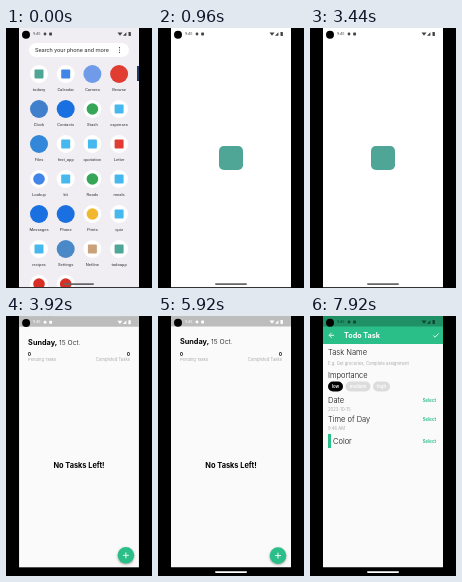
An HTML page with a canvas for the animation above (8 s loop, 146x260 px).

```html
<!DOCTYPE html>
<html lang="en">
<head>
<meta charset="utf-8">
<title>Todo app launch</title>
<style>
html, body { margin: 0; width: 100%; height: 100%; overflow: hidden; background: #000; }
canvas { display: block; width: 100vw; height: 100vh; }
</style>
</head>
<body>
<canvas></canvas>
<script>
const W = 146, H = 260, LOOP = 8000;
const PAGE_HEIGHT = 251.5, ROUTE_TIME = 320;
const GREEN = '#2abf88', BLUE = '#1a70e0', SKY = '#46b8ee', TEAL = '#4fa596', RED = '#e03c31';
const UI = 'Inter, "Open Sans", sans-serif', SYSTEM = 'Roboto, "Noto Sans", sans-serif';
const canvas = document.querySelector('canvas');
const ctx = canvas.getContext('2d');

const clamp = v => Math.max(0, Math.min(1, v));
const span = (t, start, length) => clamp((t - start) / length);
const lerp = (a, b, p) => a + (b - a) * p;
const easeOut = (p, power = 3) => 1 - (1 - p) ** power;

function box(x, y, w, h, color, radius = 0) {
  ctx.fillStyle = color;
  ctx.beginPath();
  ctx.roundRect(x, y, w, h, radius);
  ctx.fill();
}

function disc(x, y, r, color) {
  ctx.fillStyle = color;
  ctx.beginPath();
  ctx.arc(x, y, r, 0, 2 * Math.PI);
  ctx.fill();
}

function line(color, width, ...points) {
  ctx.strokeStyle = color;
  ctx.lineWidth = width;
  ctx.beginPath();
  points.forEach(([x, y]) => ctx.lineTo(x, y));
  ctx.stroke();
}

function text(str, x, y, size, color, { weight = 400, align = 'left', family = UI } = {}) {
  ctx.font = `${weight} ${size}px ${family}`;
  ctx.textAlign = align;
  ctx.textBaseline = 'middle';
  ctx.fillStyle = color;
  ctx.fillText(str, x, y);
}

function clipTo(x, y, w, h, draw) {
  ctx.save();
  ctx.beginPath();
  ctx.rect(x, y, w, h);
  ctx.clip();
  draw();
  ctx.restore();
}

// Launcher entries: label, color, shape (full disc, or square / dot on a white plate)
const flutterApp = label => [label, SKY, 'square'];
const apps = [
  ['todoey', TEAL, 'square'], ['Calendar', '#4285e8', 'square'], ['Camera', '#6f9be8', 'full'], ['Browse', RED, 'full'],
  ['Clock', '#3f7fcb', 'full'], ['Contacts', BLUE, 'full'], ['Stash', '#35a556', 'dot'], flutterApp('expenses'),
  ['Files', '#3287d8', 'full'], flutterApp('first_app'), flutterApp('quotation'), ['Letter', RED, 'square'],
  ['Lookup', '#4285e8', 'dot'], flutterApp('kit'), ['Roads', '#35a556', 'dot'], flutterApp('meals'),
  ['Messages', BLUE, 'full'], ['Phone', BLUE, 'full'], ['Prints', '#f0b72f', 'dot'], flutterApp('quiz'),
  flutterApp('recipes'), ['Settings', '#4a88c8', 'full'], ['Netline', '#c9a27c', 'square'], ['todoapp', TEAL, 'square'],
  ['', '#d93025', 'dot'], ['', '#d93025', 'dot']
];

function appIcon(x, y, color, shape) {
  disc(x, y, 9, shape === 'full' ? color : '#fff');
  if (shape === 'square') box(x - 4.5, y - 4.5, 9, 9, color, 1);
  if (shape === 'dot') disc(x, y, 5.8, color);
}

function screenEdge() {
  box(13, 259, 120, 1, '#333');
}

function launcher() {
  box(13, 0, 120, 260, '#f0eef2');
  box(23, 15, 100, 14, '#fff', 7);
  text('Search your phone and more', 29, 22.3, 5.8, '#333', { family: SYSTEM });
  [19.7, 22, 24.3].forEach(y => disc(113.5, y, 0.6, '#333'));
  apps.forEach(([label, color, shape], i) => {
    const x = 33 + (i % 4) * 26.7, y = 46 + Math.floor(i / 4) * 35;
    appIcon(x, y, color, shape);
    text(label, x, y + 15.5, 4.2, '#333', { align: 'center', family: SYSTEM });
  });
  box(131, 38, 2, 15, '#203a66');
  box(58, 255.3, 30, 1.6, '#666', 0.8);
  screenEdge();
  statusBar('#444');
}

function statusBar(color) {
  disc(20, 6.7, 4, '#000');
  text('9:45', 27, 6.1, 3.8, color, { family: SYSTEM });
  disc(39, 6, 1.4, color);
  box(43.2, 4.6, 2.8, 2.8, color, 0.6);
  ctx.fillStyle = color;
  ctx.beginPath();
  ctx.moveTo(111.5, 4.5); ctx.lineTo(116.5, 4.5); ctx.lineTo(114, 7.8);
  ctx.moveTo(117, 7.8); ctx.lineTo(120.4, 7.8); ctx.lineTo(120.4, 4.2);
  ctx.fill();
  box(122.5, 4, 2.4, 3.9, color, 0.4);
}

// The window grows out of the tapped icon until it fills the screen
function splash(t) {
  const p = easeOut(span(t, 80, 360)), wide = easeOut(span(t, 80, 360), 4);
  const x = lerp(104, 13, wide), y = lerp(213, 0, p);
  const w = lerp(18, 120, wide), h = lerp(231, 260, p) - y;
  box(x, y, w, h, '#fff', 9 * (1 - p));
  const size = lerp(9, 24, p);
  box(lerp(113, 73, p) - size / 2, lerp(222, 130, p) - size / 2, size, size, TEAL, size * 0.2);
  ctx.save();
  ctx.globalAlpha *= span(t, 400, 400);
  box(57, 255.2, 32, 1.7, '#666', 0.8);
  ctx.restore();
  screenEdge();
  statusBar('#444');
}

function addButton(t) {
  const press = span(t, 6640, 240), release = span(t, 6880, 240);
  ctx.save();
  ctx.shadowColor = 'rgba(0,0,0,.35)';
  ctx.shadowBlur = 2.5 * canvas.width / W;
  ctx.shadowOffsetY = 1 * canvas.height / H;
  disc(120, 239.6, 8.3, GREEN);
  ctx.restore();
  if (press > 0 && release < 1) {
    disc(120, 239.6, 8.3 * easeOut(press), `rgba(255,255,255,${0.25 * (1 - release)})`);
  }
  line('#fff', 0.9, [117, 239.6], [123, 239.6]);
  line('#fff', 0.9, [120, 236.6], [120, 242.6]);
}

function taskList(t) {
  const bold = { weight: 700 }, right = { align: 'right' };
  box(13, 0, 120, PAGE_HEIGHT, '#fafafa');
  box(13, 0, 120, 10.5, '#bdbdbd');
  statusBar('#fff');
  text('Sunday,', 22, 26.3, 7.3, '#000', bold);
  text('15 Oct.', 53, 26.3, 6.8, '#111', { weight: 300 });
  text('0', 22, 39, 4.3, '#000', bold);
  text('0', 124, 39, 4.3, '#000', { ...bold, ...right });
  text('Pending Tasks', 22, 43.8, 4.1, '#aaa');
  text('Completed Tasks', 124, 43.8, 4.2, '#aaa', right);
  text('No Tasks Left!', 73, 149.5, 7.4, '#000', { weight: 700, align: 'center' });
  addButton(t);
}

function chip(label, x, w, color) {
  box(x, 65.5, w, 10, color, 5);
  text(label, x + w / 2, 70.6, 4.3, '#fff', { weight: 600, align: 'center' });
}

function taskForm() {
  box(13, 0, 120, PAGE_HEIGHT, '#fafafa');
  box(13, 0, 120, 28, GREEN);
  box(13, 0, 120, 10.5, '#209066');
  statusBar('#0f4531');
  line('#fff', 0.9, [24, 19.3], [19.2, 19.3]);
  line('#fff', 0.9, [21.6, 16.8], [19.1, 19.3], [21.6, 21.8]);
  line('#fff', 0.9, [123.3, 19.5], [125, 21.2], [128.6, 17.5]);
  text('Todo Task', 34, 19.5, 7.2, '#fff', { weight: 700 });
  const heading = (label, y, x = 18) => text(label, x, y, 7.5, '#111', { weight: 300 });
  const hint = (label, y) => text(label, 18, y, 4.2, '#aaa');
  heading('Task Name', 37);
  hint('E.g. Get groceries, Complete assignment', 48);
  heading('Importance', 59.3);
  chip('low', 18, 15, '#000');
  chip('medium', 35.5, 25, '#dcdcdc');
  chip('high', 63, 17, '#dcdcdc');
  heading('Date', 84.5);
  hint('2023-10-15', 94);
  heading('Time of Day', 103.5);
  hint('9:46 AM', 113);
  box(18, 118, 3, 14, GREEN);
  heading('Color', 125.5, 23);
  [84.5, 103.5, 125.5].forEach(y => text('Select', 126, y, 4.3, GREEN, { weight: 700, align: 'right' }));
}

function scaled(factor, draw) {
  ctx.save();
  ctx.translate(73, 126);
  ctx.scale(factor, factor);
  ctx.translate(-73, -126);
  draw();
  ctx.restore();
}

// Material zoom route: the new page fades in early and grows over a dimmed, slightly enlarged old page
function zoomRoute(p, from, to) {
  if (p === 0) return from();
  if (p === 1) return to();
  const eased = easeOut(p);
  scaled(1 + 0.05 * eased, from);
  box(13, 0, 120, 260, `rgba(0,0,0,${0.5 * eased})`);
  ctx.save();
  ctx.globalAlpha = span(p, 0.1, 0.25);
  scaled(lerp(0.85, 1, eased), to);
  ctx.restore();
}

function navigationBar(t) {
  box(13, PAGE_HEIGHT, 120, H - PAGE_HEIGHT, '#000');
  const glow = span(t, 4480, 160);
  box(57, 255.2, 32, 1.7, `rgba(255,255,255,${glow})`, 0.8);
}

function render(t) {
  box(0, 0, W, H, '#000');
  clipTo(13, 0, 120, 260, () => {
    const toList = span(t, 3680, ROUTE_TIME), toForm = span(t, 7360, ROUTE_TIME);
    const list = () => taskList(t);
    if (t < 440) launcher();
    if (toList === 1) zoomRoute(toForm, list, taskForm);
    else if (t >= 80) zoomRoute(toList, () => splash(t), list);
    if (toList > 0.2) navigationBar(t);
  });
}

function frame() {
  const ratio = window.devicePixelRatio || 1;
  const width = Math.round(innerWidth * ratio), height = Math.round(innerHeight * ratio);
  if (canvas.width !== width || canvas.height !== height) {
    canvas.width = width;
    canvas.height = height;
  }
  ctx.setTransform(width / W, 0, 0, height / H, 0, 0);
  render((performance.now() - start) % LOOP);
  requestAnimationFrame(frame);
}

const start = performance.now();
frame();
</script>
</body>
</html>
```
